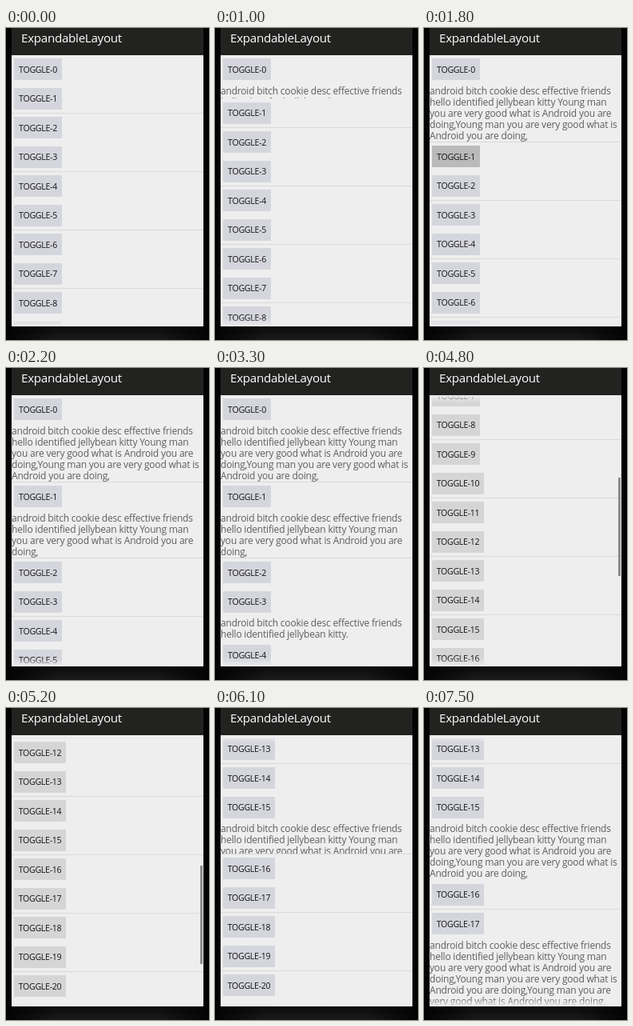
An HTML page for the animation above (8000 ms loop, 254 px wide and 390 px high).

```html
<!DOCTYPE html>
<html lang="en">
<head>
<meta charset="utf-8">
<title>ExpandableLayout</title>
<style>
  html, body { margin: 0; width: 100%; height: 100%; overflow: hidden; background: #030303; }
  body { font-family: "Open Sans", "Noto Sans", sans-serif; }
  #stage { position: relative; width: 254px; height: 390px; overflow: hidden; background: #030303; }
  #base { position: absolute; left: 0; top: 373px; width: 254px; height: 17px;
          background: linear-gradient(90deg, #030303, #03030300 25% 75%, #030303), linear-gradient(#0b0b0b, #1b1b1b); }
  h1 { position: absolute; left: 7px; top: 0; width: 228px; height: 34px; margin: 0; padding-left: 12px;
       background: #222321; color: #fff; font-size: 15.2px; font-weight: 400; line-height: 25px; letter-spacing: -.02em; }
  #list { position: absolute; left: 7px; top: 34px; width: 240px; height: 339px; overflow: hidden; background: #eeeeef; }
  .row, .btn, .text, .line, .fade, #bar { position: absolute; }
  .row { left: 0; width: 240px; }
  .btn { left: 3px; width: 60px; height: 27px; border-radius: 1px; color: #151515; font-size: 10.6px; letter-spacing: -.028em; text-align: center; white-space: nowrap; }
  .wide { width: 65px; }
  .text { left: 0; top: 36px; width: 240px; overflow: hidden; white-space: pre; color: #5e5e5e; font-size: 12px; line-height: 14px; letter-spacing: -.0165em; }
  .text::before { content: ""; display: block; height: 2px; }
  .line { left: 0; width: 240px; height: 1px; background: #dadadb; }
  .fade { left: 0; width: 240px; height: 10px; }
  #top { top: 0; background: linear-gradient(#eeeeef, #eeeeef00); }
  #bottom { bottom: 0; background: linear-gradient(#eeeeef00, #eeeeef); }
  #bar { right: 1px; width: 3px; background: #8c8c8c; }
</style>
</head>
<body>
<div id="stage">
  <div id="base"></div>
  <h1>ExpandableLayout</h1>
  <div id="list">
    <div id="rows"></div>
    <div id="top" class="fade"></div>
    <div id="bottom" class="fade"></div>
    <div id="bar"></div>
  </div>
</div>
<script>
const LOOP = 8000, TICK = 100, COUNT = 25, VIEW = 339;
// Layout is in half pixels, so one-unit dividers only show on odd positions.
const ROW = 72;
const LINES = [
  "android bitch cookie desc effective friends",
  "hello identified jellybean kitty Young man",
  "you are very good what is Android you are",
  "doing,Young man you are very good what is",
  "Android you are doing,Young man you are",
  "very good what is Android you are doing,"
];
const TAILS = { 2: "hello identified jellybean kitty.", 4: "doing,", 5: "Android you are doing,", 6: LINES[5] };
const TAPS = [
  { row: 0, press: 900, open: 900, lines: 5 },
  { row: 1, press: 1800, open: 1900, lines: 4 },
  { row: 3, press: 3000, open: 3000, lines: 2 },
  { row: 15, press: 5800, open: 5940, lines: 5 },
  { row: 17, press: 7200, open: 7200, lines: 6 }
];
const OPEN_MS = 300;
const FLING = { start: 4400, end: 5527, distance: 1273 };

const el = id => document.getElementById(id);
const clamp = x => Math.min(1, Math.max(0, x));
const ease = x => (1 - Math.cos(Math.PI * clamp(x))) / 2;

function add(parent, cls, text = "") {
  const node = document.createElement("div");
  node.className = cls;
  node.textContent = text;
  return parent.appendChild(node);
}

const rows = Array.from({ length: COUNT }, (_, i) => {
  const box = add(el("rows"), "row");
  const tap = TAPS.find(t => t.row === i);
  return {
    box, tap,
    btn: add(box, i > 9 ? "btn wide" : "btn", "TOGGLE-" + i),
    text: tap && add(box, "text", [...LINES.slice(0, tap.lines - 1), TAILS[tap.lines]].join("\n")),
    line: add(box, "line")
  };
});

// A short drag, then a fling with constant deceleration.
function scrollAt(t) {
  if (t < FLING.start) return 0;
  if (t < FLING.start + TICK) return 140;
  const left = Math.max(0, FLING.end - t) * 0.01957;
  return Math.round(FLING.distance - 2 * left * left);
}

function render(t) {
  const scroll = scrollAt(t);
  const moving = t >= FLING.start && t < 5600;
  let y = -scroll, first = 0, last = 0;

  rows.forEach(({ box, tap, btn, text, line }, i) => {
    const extra = tap ? Math.round((28 * tap.lines + 5) * ease((t - tap.open) / OPEN_MS)) : 0;
    const end = y + ROW + extra;
    const top = Math.floor(y / 2), odd = y & 1;
    const pressed = tap && t >= tap.press && t < tap.press + TICK;

    box.style.top = top + "px";
    // The button edge rounds up; its label keeps its place in the row.
    btn.style.top = 4 + odd + "px";
    btn.style.lineHeight = 29 - 2 * odd + "px";
    btn.style.background = pressed ? "#bababa" : moving ? "#d5d5d5" : "#d5d6dd";
    if (text) text.style.height = extra / 2 + "px";
    line.style.top = Math.floor(end / 2) - top + "px";
    line.style.visibility = end & 1 ? "visible" : "hidden";

    const size = end + 1 - y;
    first += clamp(-y / size);
    last += clamp((2 * VIEW - y) / size);
    y = end + 1;
  });

  el("top").style.opacity = clamp(scroll / 24);
  const bar = el("bar").style;
  bar.visibility = moving ? "visible" : "hidden";
  bar.top = first * 13.75 + "px";
  bar.height = (last - first) * 13.24 + "px";
}

const begin = performance.now();
function frame() {
  const t = (performance.now() - begin) % LOOP;
  render(Math.floor(t / TICK) * TICK);
  requestAnimationFrame(frame);
}
frame();
</script>
</body>
</html>
```
